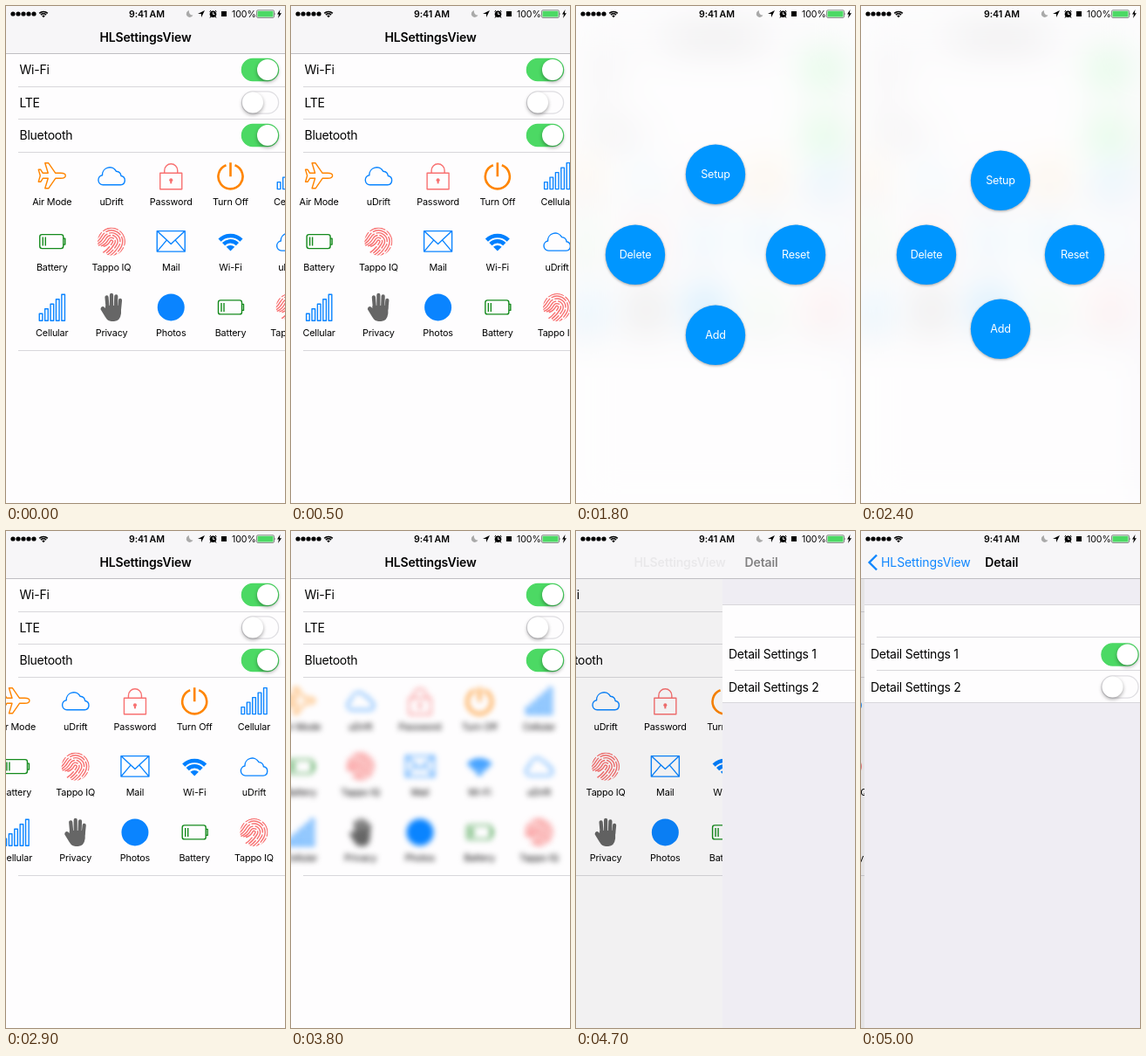
Animation of 320x569 px, one loop 5100 ms. Source, as an HTML page:

```html
<!DOCTYPE html>
<html lang="en">
<head>
<meta charset="utf-8">
<title>HLSettingsView</title>
<style>
  html, body { margin: 0; width: 100%; height: 100%; overflow: hidden; background: #fefdfe; }
  svg { display: block; width: 100vw; height: 100vh; }
  text { font: 14px Inter, Roboto, sans-serif; letter-spacing: -.25px; fill: #000; }
  .bold { font-weight: 600; letter-spacing: -.15px; }
  .label { font-size: 10.8px; letter-spacing: -.15px; text-anchor: middle; }
  .mid { text-anchor: middle; }
  .status text { font-size: 10.6px; letter-spacing: -.1px; }
  .button circle { fill: #0096ff; filter: drop-shadow(0 1.5px 1.5px rgba(0, 0, 0, .35)); }
  .button text { font-size: 12.6px; letter-spacing: -.25px; fill: #fff; text-anchor: middle; }
  .knob { fill: #fff; filter: drop-shadow(0 2px 2px rgba(0, 0, 0, .35)); }
  .rule { stroke: #d8d7db; stroke-width: 1; }
  .line { fill: none; stroke-width: 1.4; stroke-linejoin: round; }
</style>
</head>
<body>
<svg viewBox="0 0 320 569" preserveAspectRatio="none">
  <clipPath id="fingertip"><circle r="16"/></clipPath>
  <g id="screen">
    <rect width="320" height="569" fill="#fefdfe"/>
    <g id="home">
      <g id="rows"></g>
      <g id="blurred"><g id="cells"></g></g>
    </g>
    <rect id="dim" y="55" width="320" height="514" opacity="0"/>
    <g id="detail"></g>
    <g id="nav">
      <rect width="320" height="54.5" fill="#f7f6f8"/>
      <path d="M0 54.5H320" stroke="#bfbec3"/>
      <text id="title" class="bold mid" x="160" y="41">HLSettingsView</text>
      <g id="back">
        <path d="M17 27.5L8.500 36L17 44.500" fill="none" stroke="#0a84ff" stroke-width="2.4"/>
        <text x="22" y="41" style="fill:#0a84ff;letter-spacing:-.1px">HLSettingsView</text>
      </g>
      <text id="detailTitle" class="bold mid" x="160" y="41">Detail</text>
    </g>
  </g>
  <rect id="veil" width="320" height="569" fill="#fefdfe" opacity="0"/>
  <g id="buttons"></g>
  <g id="status" class="status"></g>
</svg>
<script>
const $ = id => document.getElementById(id);
const BLUE = '#0a84ff', ORANGE = '#ff8500', PINK = '#f87171', GREEN = '#148a1c', GREY = '#666';
const clamp = v => Math.min(1, Math.max(0, v));
const times = (n, fn) => Array.from({ length: n }, (_, i) => fn(i)).join('');
const rule = (y, x = 14) => `<path class="rule" d="M${x} ${Math.floor(y) + .5}H320"/>`;
const line = (d, color) => `<path class="line" stroke="${color}" d="${d}"/>`;

const toggle = (x, y, on) => `<g transform="translate(${x} ${y})">
  <rect x=".7" y="-12.6" width="42.2" height="25.2" rx="12.6" stroke-width="1.3"
    fill="${on ? '#4cd964' : '#fefdfe'}" stroke="${on ? '#4cd964' : '#dfdee2'}"/>
  <circle class="knob" cx="${on ? 30.3 : 13.3}" r="12"/></g>`;

function wifi(color) {
  const arc = r => `M${-r * .7} ${11 - r * .7}A${r} ${r} 0 0 1 ${r * .7} ${11 - r * .7}`;
  return `<g fill="none" stroke="${color}" stroke-width="4.5">
    <path d="${arc(17.8)}${arc(11.4)}"/><path d="${arc(6.8)}L0 11Z" fill="${color}" stroke="none"/></g>`;
}

// One ridge: an arch with both legs trailing off towards the base of the finger.
const ridge = r => `M${-r - 4} ${9 + r / 3}Q${-r} 6 ${-r} 0A${r} ${r} 0 0 1 ${r} 0Q${r} 9 ${r - 5} 18`;

const icons = {
  plane: () => line(`M15.500 0C15.500-2 13-3 10-3H4L-4-14.500H-8L-4.500-3H-10.500L-13-7H-15.500L-13.500 0
    L-15.500 7H-13L-10.500 3H-4.500L-8 14.500H-4L4 3H10C13 3 15.500 2 15.500 0Z`, ORANGE),
  cloud: () => line(`M-9.800 10.500A5.600 5.600 0 0 1-10.500-.6A8.500 8.500 0 0 1 5.500-5
    A6 6 0 0 1 11 .2A5.200 5.200 0 0 1 10.500 10.500Z`, BLUE),
  lock: () => line('M-12.500-3H12.500V15.500H-12.500ZM-7.500-3V-6A7.500 7.500 0 0 1 7.500-6V-3', PINK) +
    `<circle cy="5" r="2" fill="${PINK}"/><path d="M0 5V9" stroke="${PINK}" stroke-width="2"/>`,
  power: () => `<path fill="none" stroke="${ORANGE}" stroke-width="2.6"
    d="M-5-12A14 14 0 1 0 5-12M0-15V1"/>`,
  bars: () => line(times(5, i => `M${-14.500 + i * 6.4} 15.300V${7.3 - i * 5.5}h3.600V15.300Z`), BLUE),
  battery: () => line('M-11.500-8H10.500Q13-8 13-5.500V5.500Q13 8 10.500 8H-11.500Q-14 8-14 5.500V-5.500Q-14-8-11.500-8ZM13-3.500H15V3.500H13M-10.500-5V5M-7.500-5V5', GREEN),
  finger: () => `<g clip-path="url(#fingertip)"><path fill="none" stroke="${PINK}" stroke-width="1.4"
    stroke-dasharray="19 1.8" transform="rotate(28)" d="${times(6, i => ridge(1.5 + i * 2.8))}"/></g>`,
  mail: () => line('M-16-12H16V11.500H-16ZM-16-12L0 3L16-12M-16 11.500L-5-1.500M16 11.500L5-1.500', BLUE),
  wifi: () => wifi('#0080ff'),
  hand: () => `<g fill="${GREY}" stroke="${GREY}" stroke-linecap="round" stroke-linejoin="round">
    <path stroke-width="4.2" d="M-4.500 0L-5.500-11.500M0 0V-14M4.800 0L5.300-12.500M9 2L10-8"/>
    <path stroke-width="2" d="M-6-1H10V7Q9 15 3 15H0Q-4 15-6 11L-11.500 2Q-11-1-8.500 1L-6 4Z"/></g>`,
  disc: () => `<circle r="15.500" fill="${BLUE}"/>`
};

const grid = [
  ['plane Air Mode', 'cloud uDrift', 'lock Password', 'power Turn Off', 'bars Cellular'],
  ['battery Battery', 'finger Tappo IQ', 'mail Mail', 'wifi Wi-Fi', 'cloud uDrift'],
  ['bars Cellular', 'hand Privacy', 'disc Photos', 'battery Battery', 'finger Tappo IQ']
];
$('cells').innerHTML = grid.map((row, r) => row.map((cell, c) => {
  const [icon, ...words] = cell.split(' ');
  return `<g transform="translate(${52.75 + c * 68.25} ${194.3 + r * 75.3})">
    ${icons[icon]()}<text class="label" y="33.5">${words.join(' ')}</text></g>`;
}).join('')).join('');

$('rows').innerHTML = ['Wi-Fi', 'LTE', 'Bluetooth'].map((name, i) => {
  const y = 73 + i * 37.5;
  return `<text x="15.5" y="${y + 5}">${name}</text>${toggle(269.7, y, i !== 1)}${rule(y + 19.2)}`;
}).join('') + rule(394.5);

$('detail').innerHTML = `<rect y="55" width="320" height="514" fill="#efedf3"/>
  <rect y="84.5" width="320" height="112" fill="#fefdfe"/>
  ${rule(84.5, 0)}${rule(121.5)}${rule(159.2)}${rule(196.5, 0)}` +
  times(2, i => `<text x="7" y="${146 + i * 37.5}">Detail Settings ${i + 1}</text>
    ${toggle(271.3, 141.5 + i * 37, !i)}`);

const actions = [['Setup', 0, -1], ['Reset', 1, 0], ['Add', 0, 1], ['Delete', -1, 0]];
$('buttons').innerHTML = actions.map(([name]) =>
  `<g class="button"><circle r="34.2"/><text y="4.6">${name}</text></g>`).join('');

$('status').innerHTML = times(5, i => `<circle cx="${8 + i * 6}" cy="9" r="2.6"/>`) +
  `<g transform="translate(43 9) scale(.38)">${wifi('#000')}</g>
  <text class="mid" x="161.5" y="12.8" style="font-weight:600">9:41 AM</text>
  <path d="M210 5A4 4 0 1 0 214.500 10.500A4.300 4.300 0 0 1 210 5Z" fill="#aaa"/>
  <path d="M228 5L220 9H224V13Z"/>
  <circle cx="237.500" cy="9.300" r="3.800"/>
  <path d="M237.500 7V9.500H239.500" fill="none" stroke="#fff" stroke-width=".9"/>
  <path d="M233.500 6.500L235 5M241.500 6.500L240 5M235 12L234 13.500M240 12L241 13.500" stroke="#000"/>
  <rect x="247" y="6" width="6" height="6"/>
  <text x="259" y="12.8">100%</text>
  <rect x="287.500" y="4.800" width="20" height="8.600" rx="1.500" fill="none" stroke="#555" stroke-width=".7"/>
  <rect x="288.500" y="5.800" width="18" height="6.600" rx=".7" fill="#4cd964"/>
  <path d="M308.300 7.500q1.200 1.600 0 3.200Z" fill="#555"/>
  <path d="M314.500 4L311 9.500H313L312 14L316 8.300H313.800Z"/>`;

const LOOP = 5100, TICK = 100, RADIUS = 85, PUSH = 4600;
const popups = [
  { show: 1500, hide: 2600, spread: s => 1 - Math.exp(-10 * s) * (Math.cos(12.6 * s) + .8 * Math.sin(12.6 * s)) },
  { show: 3800, hide: 4300, spread: s => 1 - (1 + 20 * s) * Math.exp(-20 * s) }
];
const buttons = [...$('buttons').children];

function drawPopup(t) {
  const popup = popups.find(p => t >= p.show && t < p.hide + 300);
  const leaving = popup ? 1 - clamp((t - popup.hide) / 300) : 0;
  const amount = popup ? Math.min(clamp((t - popup.show) / 200), leaving) : 0;
  const r = popup ? RADIUS * leaving * popup.spread(Math.max(0, t - popup.show - 50) / 1000) : 0;
  $('blurred').style.filter = popup ? 'blur(3px)' : 'none';
  $('screen').style.filter = amount ? `saturate(${1 + .8 * amount}) blur(${22 * amount}px)` : 'none';
  $('veil').setAttribute('opacity', .64 * amount);
  $('buttons').setAttribute('opacity', amount);
  buttons.forEach((button, i) => {
    const [, dx, dy] = actions[i];
    button.setAttribute('transform', `translate(${160 + dx * r} ${284.8 + dy * r})`);
  });
}

function drawPush(t) {
  const s = 16 * Math.max(0, t - PUSH) / 1000;
  const left = (1 + s) * Math.exp(-s), done = 1 - left;
  const shift = (id, x) => $(id).setAttribute('transform', `translate(${x} 0)`);
  shift('home', -96 * done);
  shift('detail', 320 * left);
  shift('title', -86 * done);
  shift('back', 86 * left);
  shift('detailTitle', 100 * left);
  $('dim').setAttribute('opacity', .1 * done);
  $('title').setAttribute('opacity', clamp(1 - 2 * done));
  $('back').setAttribute('opacity', clamp(2 * done - 1));
  $('detailTitle').setAttribute('opacity', done);
}

function draw(now) {
  const t = Math.floor(now % LOOP / TICK) * TICK;
  const s = clamp((t - 200) / 600);
  $('cells').setAttribute('transform', `translate(${-41.3 * s * s * (3 - 2 * s)} 0)`);
  drawPopup(t);
  drawPush(t);
}

const start = performance.now();
function frame() {
  draw(performance.now() - start);
  requestAnimationFrame(frame);
}
frame();
</script>
</body>
</html>
```
